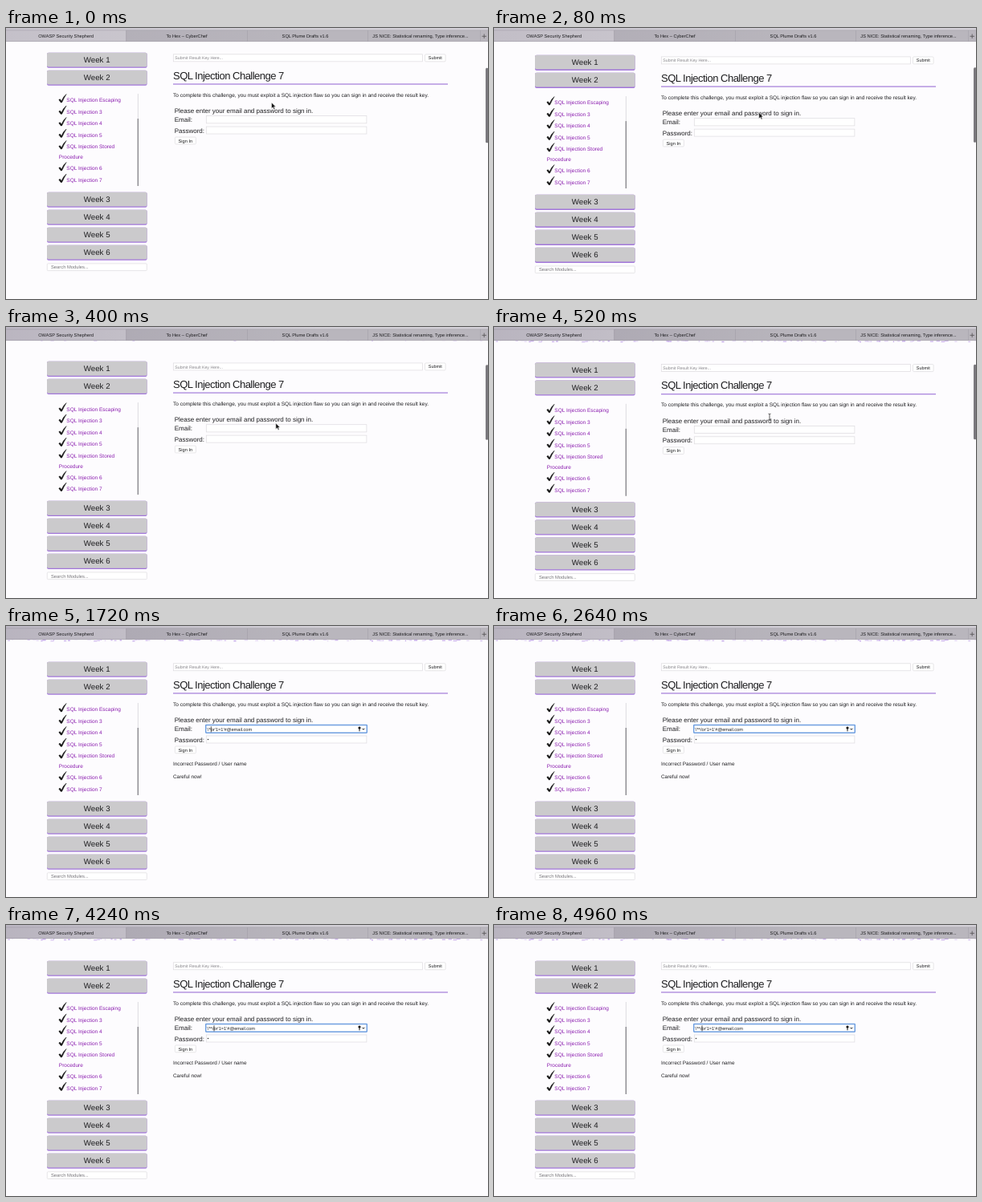
An HTML page for the animation above (5 s loop, 600 by 338 pixels).

```html
<!DOCTYPE html>
<html lang="en">
<head>
<meta charset="utf-8">
<title>Challenge page</title>
<style>
  html, body { margin: 0; width: 100%; height: 100%; overflow: hidden; background: #fdfcfe; }
  svg { display: block; width: 100%; height: 100%; }
  text { font-family: "Liberation Sans", Arial, sans-serif; fill: #1e1e20; text-rendering: geometricPrecision; white-space: pre; }
</style>
</head>
<body>
<svg id="stage" viewBox="0 0 600 338"></svg>
<script>
const LOOP = 5000;
const CUT = 560;
const stage = document.getElementById('stage');
const $ = id => document.getElementById(id);

const text = (x, y, size, str, attrs = '') =>
  `<text x="${x}" y="${y}" font-size="${size}" ${attrs}>${str}</text>`;
const rect = (x, y, w, h, fill, attrs = '') =>
  `<rect x="${x}" y="${y}" width="${w}" height="${h}" fill="${fill}" ${attrs}/>`;
const box = (x, y, w, h, r = 0, stroke = '#dddbdf') =>
  rect(x, y, w, h, '#fff', `rx="${r}" stroke="${stroke}" stroke-width=".7"`);
const MID = 'text-anchor="middle"';

function week(n, y) {
  return rect(51, y, 124.6, 19.1, '#a276da', 'rx="2"') +
    rect(51, y, 124.6, 17.8, '#cbcacc', 'rx="2"') +
    text(113.2, y + 12.5, 9.7, 'Week ' + n, MID);
}

function lesson(label, y) {
  return `<path transform="translate(65.8 ${y - 1.1})" fill="#111" stroke="#111" stroke-width=".5"
    d="M0 .6Q1.5-.9 2.2.6L3.2 2.2Q5.4-3.4 9.3-6.4Q6-1 4 3.6Q2.9 4.6 2.1 3.6Z"/>` +
    text(75.3, y + 2.4, 6.52, label, 'style="fill:#8a1cae"');
}

// Lower edge of the purple page banner
function banner() {
  let seed = 11, out = '';
  const rnd = () => (seed = seed * 16807 % 2147483647) / 2147483647;
  for (let x = 0; x < 600; x += 2 + rnd() * 6) {
    const y = 14 + rnd() * 4;
    out += rect(x.toFixed(1), y.toFixed(1), (1 + rnd() * 4).toFixed(1), 1.5,
      '#a97fe0', `opacity="${(.2 + rnd() * .45).toFixed(2)}"`);
  }
  return out;
}

function page() {
  const lessons = [['Escaping', 104], ['3', 118.4], ['4', 133], ['5', 147.5],
    ['Stored', 162], ['6', 189], ['7', 203.6]];
  return banner() +
    week(1, 44.7) + week(2, 66.7) +
    lessons.map(([s, y]) => lesson('SQL Injection ' + s, y)).join('') +
    text(65.8, 177.4, 6.52, 'Procedure', 'style="fill:#8a1cae"') +
    rect(163.9, 96, .7, 31, '#cfcdd2') + rect(163.7, 127, 1.1, 84, '#6d6b71') +
    [3, 4, 5, 6].map((n, i) => week(n, 218.7 + i * 22)).join('') +
    box(51.3, 307.8, 124, 8.8, 1) +
    text(56, 314.4, 5.8, 'Search Modules...', 'style="fill:#77757a"') +
    box(208.3, 46.8, 310, 9, 0) +
    text(210.3, 53.4, 5.2, 'Submit Result Key Here...', 'style="fill:#858388"') +
    box(521.5, 46.8, 25.6, 9, 1.2) + text(534.3, 53.3, 5.5, 'Submit', MID) +
    text(208, 77.6, 13, 'SQL Injection Challenge 7', 'letter-spacing="-.51"') +
    rect(208, 83.4, 342, 1.1, '#9a70d6') +
    text(208, 99.5, 6.53, 'To complete this challenge, you must exploit a SQL injection flaw so you can sign in and receive the result key.') +
    text(209.7, 119.9, 8, 'Please enter your email and password to sign in.') +
    text(209.7, 131.3, 8, 'Email:') + text(209.7, 144.6, 8, 'Password:') +
    box(249.3, 123.6, 199.6, 9.2) + box(249.3, 137, 199.6, 9) +
    box(210.4, 150, 26, 8.8, 1.2) + text(223.4, 156.6, 5.7, 'Sign In', MID) +
    `<g id="reply">
      <rect x="248.7" y="123.4" width="200.6" height="9.8" rx=".6" fill="#fff" stroke="#6f9fe0" stroke-width="1.5"/>
      ${text(250, 130.6, 5.65, '', 'id="email"')}
      <rect id="caret" y="125.3" width=".8" height="7.2" fill="#222"/>
      <circle cx="440" cy="127" r="1.6" fill="#111"/>
      <path d="M440 128V131.3M443.4 127.8L444.9 129.3L446.4 127.8" fill="none" stroke="#111" stroke-width="1"/>
      <circle cx="251.5" cy="141.5" r=".8" fill="#333"/>
      ${text(208, 174, 6.42, 'Incorrect Password / User name')}
      ${text(208, 190.4, 6.4, 'Careful now!')}
    </g>`;
}

function tabs() {
  const names = [[74.7, 'OWASP Security Shepherd'], [225, 'To Hex – CyberChef'],
    [372.5, 'SQL Plume Drafts v1.6'], [516, 'JS NICE: Statistical renaming, Type inference...']];
  return `<linearGradient id="tint"><stop stop-color="#6f6580" stop-opacity=".24"/>
      <stop offset=".65" stop-color="#6f6580" stop-opacity="0"/></linearGradient>` +
    rect(0, 0, 600, 17, '#b9b6bd') + rect(0, 0, 149.5, 17, '#d0cdd3') +
    rect(0, 0, 600, 2.6, '#d3d0d7') + rect(0, 2.6, 600, .6, '#aaa7af') +
    [149.5, 300, 450, 590].map(x => rect(x, 3, .6, 14, '#a3a0a8')).join('') +
    rect(0, 16.5, 600, .6, '#a7a4ac') +
    rect(0, 0, 600, 17, 'url(#tint)', 'id="shade"') +
    names.map(([x, s]) => text(x, 12.4, 5.68, s, MID)).join('') +
    '<path d="M592.5 10.3H598M595.2 7.5V13" stroke="#444" stroke-width=".7"/>';
}

stage.innerHTML = rect(0, 0, 600, 338, '#fdfcfe') +
  `<g id="page">${page()}</g>${tabs()}` +
  '<rect id="thumb" x="597" width="3.4" height="93.5" rx="1.5" fill="#7b797e"/>' +
  `<g id="pointer">
    <path id="arrow" d="M0 0V7.4L1.8 5.8L3 8.5L4.3 7.9L3.1 5.3H5.3Z" fill="#111" stroke="#fff" stroke-width=".5"/>
    <path id="beam" d="M-1.5-3.8Q0-3.8 0-2.8Q0-3.8 1.5-3.8M0-2.8V2.8M-1.5 3.8Q0 3.8 0 2.8Q0 3.8 1.5 3.8" fill="none" stroke="#333" stroke-width=".8"/>
  </g>`;

const path = [[0, 330.5, 93], [200, 328.5, 128], [400, 335.8, 120], [520, 343, 112]];

function pointerAt(t) {
  const i = path.findIndex(p => p[0] > t);
  if (i < 0) return path[path.length - 1].slice(1);
  const [a, b] = [path[i - 1], path[i]];
  const k = (t - a[0]) / (b[0] - a[0]);
  const s = k * k * (3 - 2 * k);
  return [a[1] + (b[1] - a[1]) * s, a[2] + (b[2] - a[2]) * s];
}

const show = (id, on) => $(id).setAttribute('visibility', on ? 'inherit' : 'hidden');

const keys = [1720, 1840, 1960];

function draw(t) {
  const left = Math.pow(Math.max(0, 1 - t / CUT), 1.6);
  const dy = -14 * left;
  $('page').setAttribute('transform', `translate(0 ${dy})`);
  $('thumb').setAttribute('y', 46.8 - dy * .22);
  $('shade').setAttribute('opacity', 1 - .5 * left);

  const done = t >= CUT;
  show('reply', done);
  show('thumb', !done);
  show('pointer', !done);
  const [x, y] = pointerAt(t);
  $('pointer').setAttribute('transform', `translate(${x} ${y})`);
  show('arrow', t < 480);
  show('beam', t >= 480);

  // Typing the comment, then a blinking caret
  const typed = keys.filter(k => t >= k).length;
  const head = "'/**/".slice(0, 2 + typed);
  const value = head + "or'1=1'#@email.com";
  const email = $('email');
  if (email.textContent !== value) email.textContent = value;
  $('caret').setAttribute('x', email.getEndPositionOfChar(head.length - 1).x);
  const since = t - (typed ? keys[typed - 1] : 980);
  show('caret', since < 0 || since % 1000 < 500);
}

function tick(now) {
  draw(now % LOOP);
  requestAnimationFrame(tick);
}
draw(0);
requestAnimationFrame(tick);
</script>
</body>
</html>
```
